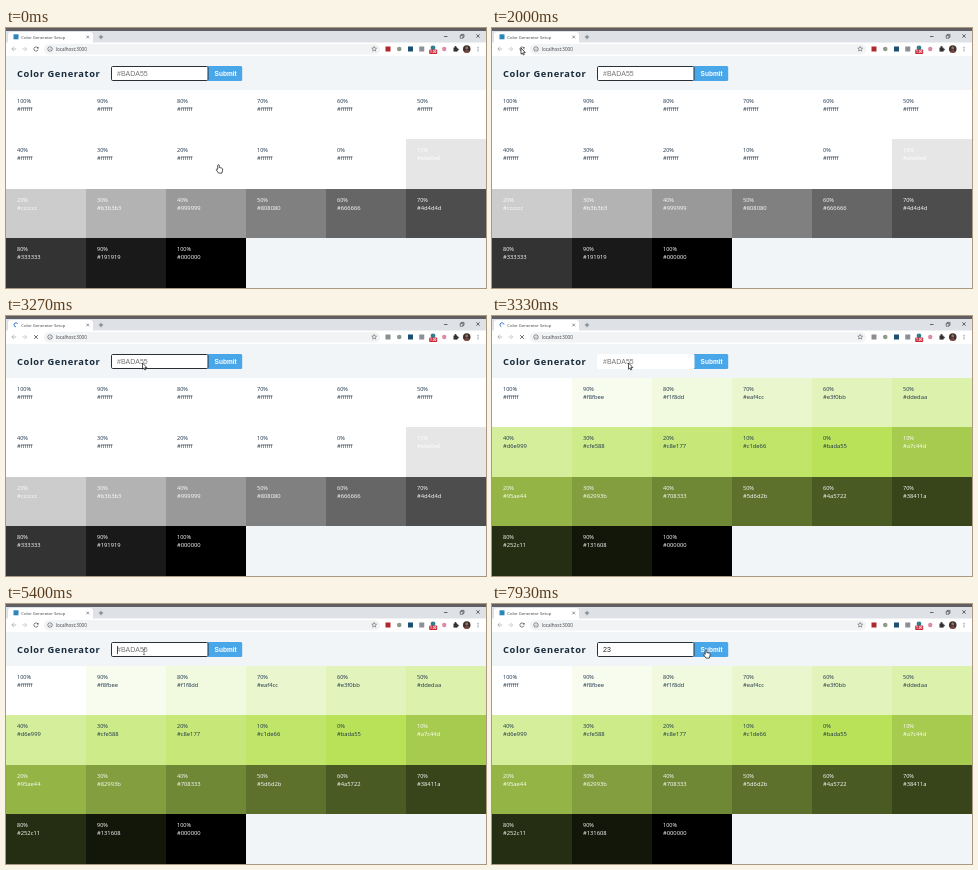
These frames come from a looping animation (480 by 260 pixels, 8000 ms). An HTML page with a canvas:

```html
<!DOCTYPE html>
<html lang="en">
<head>
<meta charset="utf-8">
<title>Color Generator</title>
<style>
html, body { margin: 0; width: 100%; height: 100%; overflow: hidden; background: #f1f5f8; }
canvas { display: block; width: 480px; height: 260px; }
</style>
</head>
<body>
<canvas id="stage"></canvas>
<script>
const W = 480, H = 260, LOOP = 8000;
const canvas = document.getElementById('stage');
const ctx = canvas.getContext('2d');
const dpr = window.devicePixelRatio || 1;
canvas.width = W * dpr;
canvas.height = H * dpr;

const SANS = '"Open Sans", "Noto Sans", sans-serif';
const ARIAL = '"Liberation Sans", Arial, sans-serif';
const GREY = '#5f6368', DARK = '#333';

// Key moments in ms
const RELOAD = 2330, REPAINT = 3330, LOADED = 3600, READY = 3930, FOCUS = 4270;
const TYPE_1 = 5670, TYPE_2 = 5930;
const BLINK = 535, CARET_RESETS = [330 - 2 * BLINK, 4330, TYPE_2];

// Pointer: rests at START, then makes these moves along bowed paths
const START = { x: 212.5, y: 136.5 };
const MOVES = [
  { from: 870, to: 1870, x: 29, y: 20, bow: -60 },
  { from: RELOAD, to: 3070, x: 136.5, y: 47, bow: 14 },
  { from: 7470, to: 7930, x: 214, y: 45.5, bow: 0 }
];

const WHITE = [255, 255, 255];
const GREEN = [186, 218, 85];
const GREEN_PAINT = [185, 226, 88]; // as the screen shows it, a little more vivid

function rect(x, y, w, h, fill) {
  ctx.fillStyle = fill;
  ctx.fillRect(x, y, w, h);
}

function paint(fill, stroke, width) {
  if (fill) { ctx.fillStyle = fill; ctx.fill(); }
  if (stroke) { ctx.strokeStyle = stroke; ctx.lineWidth = width; ctx.stroke(); }
}

function round(x, y, w, h, r, fill, stroke, width) {
  ctx.beginPath();
  ctx.roundRect(x, y, w, h, r);
  paint(fill, stroke, width);
}

function arc(x, y, r, a, b, fill, stroke, width) {
  ctx.beginPath();
  ctx.arc(x, y, r, a, b);
  paint(fill, stroke, width);
}

const disc = (x, y, r, fill) => arc(x, y, r, 0, 7, fill);
const square = (x, y, s, fill) => rect(x - s / 2, y - s / 2, s, s, fill);

function lines(stroke, width, ...paths) {
  ctx.beginPath();
  for (const p of paths)
    p.forEach(([x, y], i) => i ? ctx.lineTo(x, y) : ctx.moveTo(x, y));
  paint(null, stroke, width);
}

const cross = (x, y, r, color, width) =>
  lines(color, width, [[x - r, y - r], [x + r, y + r]], [[x + r, y - r], [x - r, y + r]]);

function text(str, x, y, font, fill, spacing = 0) {
  ctx.font = font;
  ctx.letterSpacing = spacing + 'px';
  ctx.fillStyle = fill;
  ctx.fillText(str, x, y);
}

function drawTabs(t, loading) {
  rect(0, 0, W, 15, '#dee1e6');
  rect(0, 0, W, 3, '#5f5f63');
  round(2, 4, 85, 13, [3, 3, 0, 0], '#fff');
  if (loading) arc(10, 8.8, 2, t / 160, t / 160 + 4.2, null, '#3b78c4', 1);
  else square(10, 8.8, 5, '#2d86b8');
  text('Color Generator Setup', 15.3, 10.6, '500 4.2px ' + SANS, '#3c4043');
  cross(81.7, 9, 1.3, GREY, 0.7);
  lines(GREY, 0.8, [[92.8, 9], [97.2, 9]], [[95, 6.8], [95, 11.2]]);
  lines(DARK, 0.7, [[438, 8.5], [441.5, 8.5]]);
  round(455.2, 6.4, 2.8, 2.8, 0, null, DARK, 0.6);
  round(454.2, 7.4, 2.8, 2.8, 0, '#dee1e6', DARK, 0.6);
  cross(472, 8, 1.7, DARK, 0.7);
}

function drawStar(x, y, r) {
  const points = Array.from({ length: 11 }, (_, i) => {
    const a = (i / 5 - 0.5) * Math.PI, d = i % 2 ? r * 0.45 : r;
    return [x + d * Math.cos(a), y + d * Math.sin(a)];
  });
  lines(GREY, 0.6, points);
}

// dir is -1 for back, 1 for forward
function drawNav(x, dir, color) {
  const tip = x + 2.2 * dir;
  lines(color, 0.8, [[x - 2.2 * dir, 21], [tip, 21]],
    [[x, 18.8], [tip, 21], [x, 23.2]]);
}

function drawExtensions(loading) {
  const y = 21, at = i => 382 + i * 11.25;
  square(at(0), y, 5, loading ? '#8b8e91' : '#b3262b');
  disc(at(1), y, 2.3, '#8e9a8d');
  square(at(2), y, 5, '#1d4f73');
  square(at(3), y, 5, '#8a8f98');
  disc(at(4), y - 1.2, 2.4, '#2f7f8f');
  round(at(4) - 3.8, y + 0.6, 8, 4.4, 0.8, '#c9293a');
  text('1.00', at(4) - 3, y + 4.1, 'bold 3.2px ' + SANS, '#fff');
  disc(at(5), y, 2.2, '#d98aa8');

  square(at(6), y + 0.6, 4, DARK);
  disc(at(6), y - 1.8, 1.1, DARK);
  disc(at(6) + 2.2, y + 0.6, 1.1, DARK);

  disc(at(7), y, 3.8, '#3a3230');
  disc(at(7), y - 1, 1.4, '#a5705a');
  arc(at(7), y + 3.4, 2.6, Math.PI, 0, '#79403a');
  for (const d of [-1.8, 0, 1.8]) disc(at(8), y + d, 0.55, GREY);
}

function drawToolbar(loading) {
  rect(0, 14.5, W, 13.5, '#fff');
  round(38, 16, 336, 10.5, 5.2, '#f1f3f4');
  drawNav(8, -1, '#a9acb0');
  drawNav(18.5, 1, '#c3c5c8');
  if (loading) {
    cross(30, 21, 1.9, GREY, 0.9);
  } else {
    arc(30, 21, 2.1, 0.3, 5.5, null, GREY, 0.8);
    square(31.8, 19.8, 1.6, GREY);
  }
  disc(44, 21, 2.5, GREY);
  disc(44, 21, 1.9, '#f1f3f4');
  lines(GREY, 0.6, [[44, 20.6], [44, 22.3]], [[44, 19.5], [44, 20]]);
  text('localhost:3000', 49.8, 22.8, '4.6px ' + SANS, '#3c4043');
  drawStar(368.2, 21, 2.6);
  drawExtensions(loading);
}

function caretOn(t) {
  const reset = CARET_RESETS.filter(r => r <= t).pop();
  return Math.floor((t - reset) / BLINK) % 2 === 0;
}

function drawForm(t) {
  text('Color Generator', 11, 49.4, 'bold 9.3px ' + SANS, '#172a3a', 0.6);
  const focused = t < REPAINT || t >= FOCUS;
  round(202, 38, 34.2, 15, [0, 1.5, 1.5, 0], '#49a6e9');
  text('Submit', 208.6, 48, 'bold 6.5px ' + ARIAL, '#fff');
  round(105.5, 38.5, 96.5, 14, 1.2, '#fff', focused ? '#2b3036' : '#fff', 1);

  const value = t < TYPE_1 ? '' : t < TYPE_2 ? '2' : '23';
  text(value || '#BADA55', 111, 48, '7px ' + ARIAL, value ? '#222' : '#757575');
  if (focused && caretOn(t)) {
    rect(111 + ctx.measureText(value).width, 42, 0.8, 8, '#222');
  }
}

// Ten tints, the base colour, then ten shades
function shade(base, i) {
  const p = Math.abs(10 - i) / 10;
  return '#' + base.map(c => {
    const v = Math.round(i < 10 ? c + (255 - c) * p : c * (1 - p));
    return v.toString(16).padStart(2, '0');
  }).join('');
}

function drawTiles(base, tone) {
  const top = row => Math.round(62 + row * 49.4);
  for (let i = 0; i < 21; i++) {
    const x = i % 6 * 80, row = Math.floor(i / 6), y = top(row);
    const ink = i > 10 ? '#fff' : '#1b3249';
    rect(x, y, 80, top(row + 1) - y, shade(tone, i));
    text(Math.abs(10 - i) * 10 + '%', x + 11, y + 13, '500 5.5px ' + SANS, ink);
    text(shade(base, i), x + 11, y + 21.1, '500 5.8px ' + SANS, ink);
  }
}

function pointerAt(t) {
  let { x, y } = START;
  for (const m of MOVES) {
    const p = Math.min(1, Math.max(0, (t - m.from) / (m.to - m.from)));
    const k = p * p * (3 - 2 * p);
    x += (m.x - x) * k;
    y += (m.y - y) * k + m.bow * Math.sin(Math.PI * k);
  }
  return [x, y];
}

function drawArrow() {
  ctx.beginPath();
  [[0, 0], [0, 6.2], [1.4, 5], [2.3, 7], [3.3, 6.5], [2.4, 4.6], [4.3, 4.5]]
    .forEach(([x, y]) => ctx.lineTo(x, y));
  ctx.closePath();
  paint('#fff', '#111', 0.7);
}

function drawHand() {
  ctx.beginPath();
  ctx.moveTo(-0.8, 4.8);
  ctx.lineTo(-0.8, 0.7);
  ctx.quadraticCurveTo(0, -0.5, 0.8, 0.7);
  ctx.lineTo(0.8, 3);
  ctx.lineTo(3.4, 3.6);
  ctx.quadraticCurveTo(4.4, 4, 4.2, 5.4);
  ctx.lineTo(3.4, 8.6);
  ctx.lineTo(0, 8.6);
  ctx.lineTo(-2.4, 5.2);
  ctx.quadraticCurveTo(-1.8, 4, -0.8, 4.8);
  ctx.closePath();
  paint('#fff', '#111', 0.7);
}

function drawBeam() {
  lines('#444', 0.6, [[1.5, -1.6], [1.5, 3.6]],
    [[0.4, -1.6], [2.6, -1.6]], [[0.4, 3.6], [2.6, 3.6]]);
}

function drawPointer(t) {
  const [x, y] = pointerAt(t);
  const inForm = y > 38 && y < 53;
  ctx.save();
  ctx.translate(x, y);
  if (y > 62 || (inForm && x > 202)) drawHand();
  else if (t >= READY && inForm) drawBeam();
  else drawArrow();
  ctx.restore();
}

function draw(t) {
  const loading = t >= RELOAD && t < LOADED;
  ctx.setTransform(dpr, 0, 0, dpr, 0, 0);
  rect(0, 0, W, H, '#f1f5f8');
  drawTabs(t, loading);
  drawToolbar(loading);
  drawForm(t);
  if (t < REPAINT) drawTiles(WHITE, WHITE);
  else drawTiles(GREEN, GREEN_PAINT);
  drawPointer(t);
}

const start = performance.now();
function tick(now) {
  draw(Math.max(0, now - start) % LOOP);
  requestAnimationFrame(tick);
}
draw(0);
requestAnimationFrame(tick);
</script>
</body>
</html>
```
